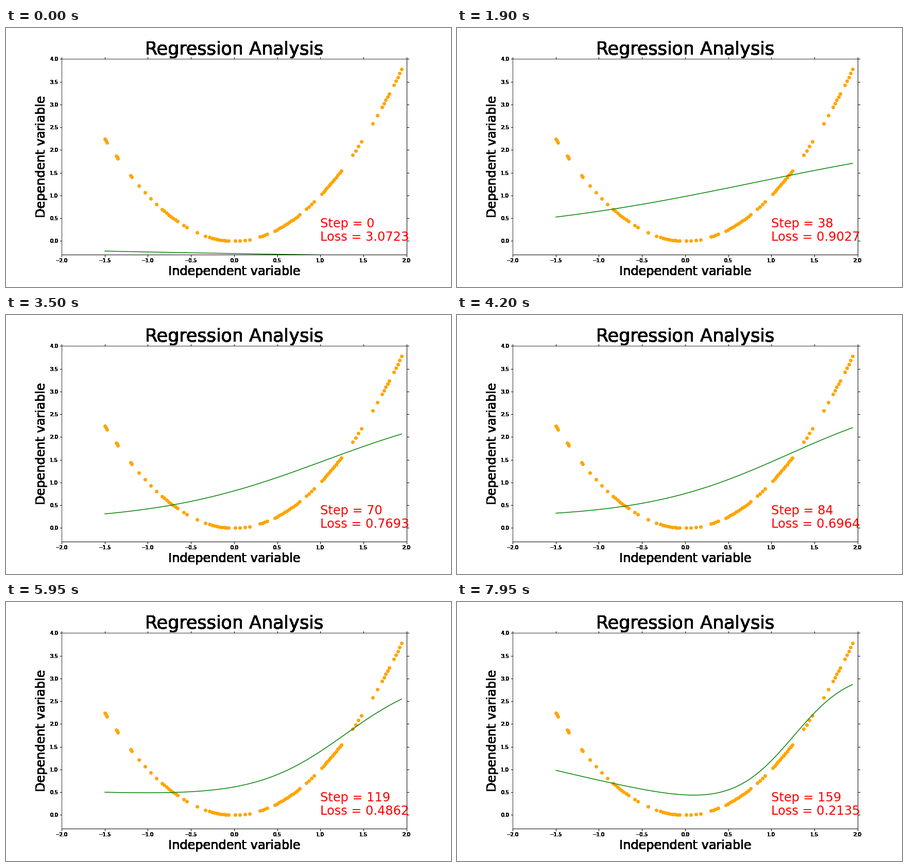
Recreate the animation shown at these times as a matplotlib script. Size 864 by 504 pixels, loop 8 s.

```python
import numpy as np
import matplotlib.pyplot as plt
from matplotlib.animation import FuncAnimation
from matplotlib.transforms import Bbox

STEPS, INTERVAL = 160, 50

# Clusters of samples: first x, last x, count.
CLUSTERS = [
    (-1.498, -1.472, 3), (-1.367, -1.348, 3), (-1.2, -1.187, 2),
    (-1.102, -.898, 4), (-.835, -.656, 8), (-.584, -.548, 2),
    (-.429, -.333, 2), (-.286, -.065, 9), (.013, .18, 4), (.3, .384, 4),
    (.473, .76, 13), (.838, .927, 4), (1.017, 1.244, 12),
    (1.375, 1.477, 4), (1.608, 1.716, 3), (1.74, 1.8, 4), (1.853, 1.943, 5)]

# Training milestones: base, tilt, height, steepness and centre of the
# sigmoid, then the loss.
MILESTONES = {
    0: (-.332, -.055, .15, .65, .80, 3.0723),
    17: (.500, 0, 1.30, .65, .80, .9600),
    38: (.088, 0, 2.39, .65, .80, .9027),
    57: (.070, 0, 2.63, .88, .90, .8298),
    84: (.220, 0, 2.80, 1.20, 1.20, .6964),
    119: (.381, -.07, 2.97, 1.90, 1.29, .4862),
    141: (.369, -.22, 3.48, 2.30, 1.31, .3358),
    159: (.305, -.45, 4.00, 2.65, 1.26, .2135),
}


def ease_between(t, ts, vals):
    """Monotone cubic interpolation of the rows of vals."""
    d = np.diff(vals, axis=0) / np.diff(ts)[:, None]
    a, b = d[:-1], d[1:]
    same = a * b > 0
    mid = np.where(same, 2 * a * b / np.where(same, a + b, 1), 0)
    m = np.vstack([d[:1], mid, d[-1:]])

    k = min(np.searchsorted(ts, t, side="right") - 1, len(ts) - 2)
    h = ts[k + 1] - ts[k]
    s = (t - ts[k]) / h
    return ((1 + 2 * s) * (1 - s) ** 2 * vals[k]
            + s * (1 - s) ** 2 * h * m[k]
            + s ** 2 * (3 - 2 * s) * vals[k + 1]
            + s ** 2 * (s - 1) * h * m[k + 1])


def model(x, base, tilt, height, steepness, centre):
    return base + tilt * x + height / (1 + np.exp(-steepness * (x - centre)))


def solid(img, dpi):
    """Hard-edged look: any covered pixel becomes opaque."""
    img[..., 3] = img[..., 3] > 0
    return img, 0, 0


marks = np.array(list(MILESTONES), dtype=float)
states = np.array(list(MILESTONES.values()))
samples = np.concatenate([np.linspace(*c) for c in CLUSTERS])
grid = np.linspace(samples[0], samples[-1], 100)

plt.rcParams.update({"font.family": "DejaVu Sans", "font.size": 10,
                     "xtick.top": True, "ytick.right": True})
fig, ax = plt.subplots(figsize=(12, 7), dpi=72)
fig.subplots_adjust(left=.125, right=.9, bottom=.125, top=.88)
ax.set_xlim(-2, 2)
ax.set_ylim(-.3, 4)
ax.set_title("Regression Analysis", fontsize=35, y=1.0, pad=8)
ax.set_xlabel("Independent variable", fontsize=24)
ax.set_ylabel("Dependent variable", fontsize=24)
for part in (ax.title, ax.xaxis, ax.yaxis):
    part.set_agg_filter(solid)
for side in ("right", "bottom"):
    ax.spines[side].set_linewidth(1)

ax.scatter(samples, samples ** 2, color="orange")
line, = ax.plot(grid, grid, color="green", lw=1.5)
red = dict(size=24, color="red")
step_text = ax.text(1, .3, "", **red)
loss_text = ax.text(1, 0, "", **red)

# The part of the loss that runs past the frame is hard-edged too.
loss_tail = ax.text(1, 0, "", clip_on=True, **red)
loss_tail.set_clip_box(Bbox([[779, 0], [864, 504]]))
loss_tail.set_agg_filter(solid)


def update(i):
    *shape, loss = ease_between(i, marks, states)
    line.set_ydata(model(grid, *shape))
    step_text.set_text(f"Step = {i}")
    for text in (loss_text, loss_tail):
        text.set_text(f"Loss = {loss:.4f}")
    return line, step_text, loss_text, loss_tail


anim = FuncAnimation(fig, update, frames=STEPS, interval=INTERVAL,
                     repeat=True, repeat_delay=0)
plt.show()
```
